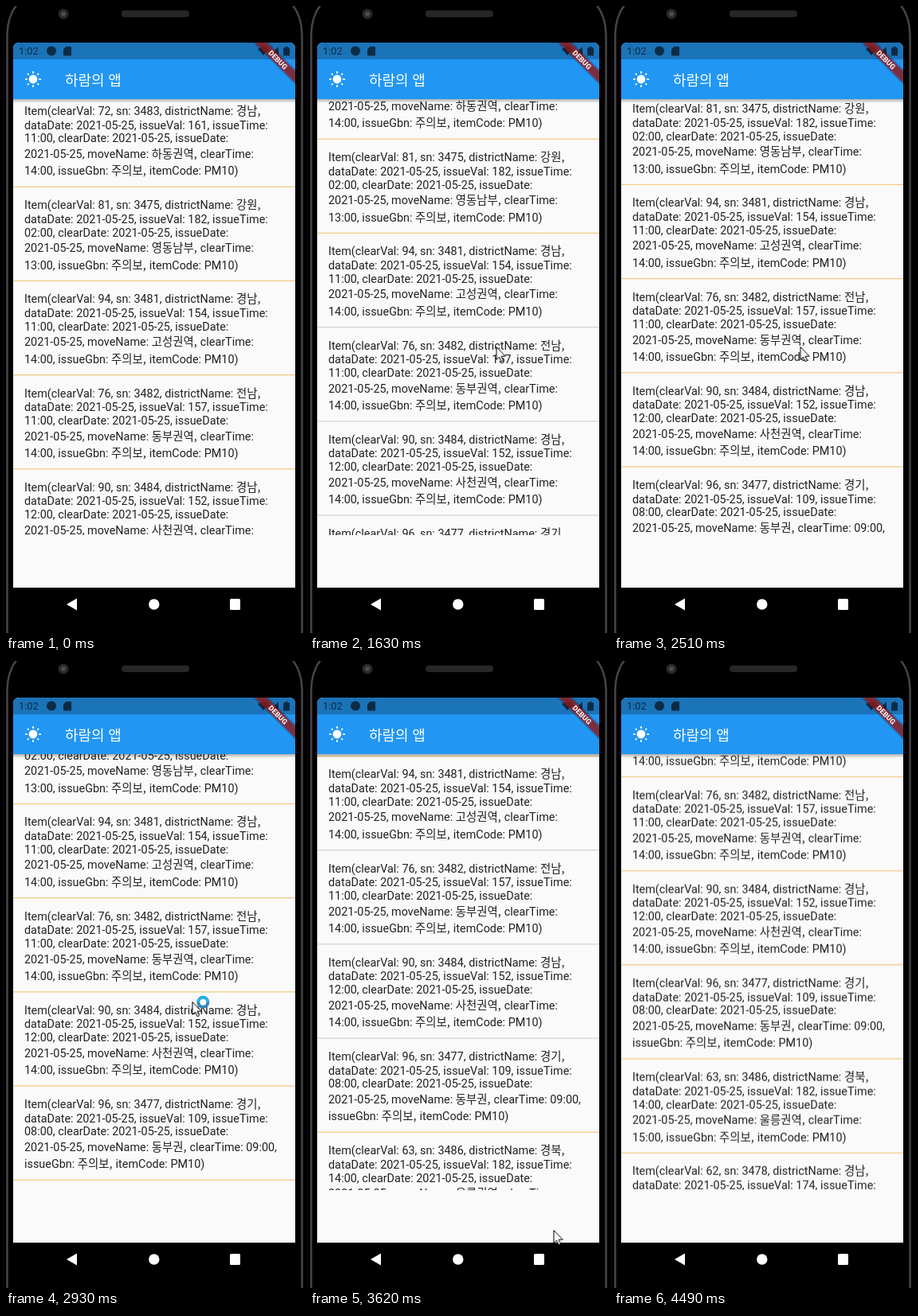
An HTML page that plays this animation: 374 by 788 pixels, repeating every 5.1 s.

```html
<!DOCTYPE html>
<html lang="ko">
<head>
<meta charset="utf-8">
<title>App list</title>
<style>
  html, body { margin: 0; width: 100%; height: 100%; overflow: hidden; background: #000; }
  svg { display: block; }
  text { font-family: Roboto, "Noto Sans CJK KR", "Noto Sans CJK", sans-serif; white-space: pre; }
  .item { font-size: 14.4px; fill: #212121; }
  .item tspan { font-family: "Noto Sans CJK KR", "Noto Sans CJK", sans-serif; }
</style>
</head>
<body>
<svg width="374" height="788" viewBox="0 0 374 788">
  <defs>
    <clipPath id="listArea"><rect x="9" y="117" width="354" height="548"/></clipPath>
    <clipPath id="screen"><path d="M9 731V54q0-8 8-8H355q8 0 8 8V731z"/></clipPath>
    <linearGradient id="shade" x2="0" y2="1">
      <stop stop-opacity=".3"/><stop offset="1" stop-opacity="0"/>
    </linearGradient>
    <filter id="blur"><feGaussianBlur stdDeviation="2.2"/></filter>
  </defs>

  <!-- phone body -->
  <rect width="374" height="788" fill="#000"/>
  <path d="M1.5 788V36Q2 12 14 -2M371.5 788V36Q371 12 359 -2" fill="none" stroke="#454547" stroke-width="2.5"/>
  <circle cx="72" cy="10" r="6.5" fill="#29292b"/>
  <circle cx="72" cy="10" r="3" fill="#4a4c52"/>
  <rect x="145" y="5.5" width="85" height="8.5" rx="4" fill="#262628"/>

  <g clip-path="url(#screen)">
    <rect x="9" y="46" width="354" height="685" fill="#fafafa"/>
    <g clip-path="url(#listArea)"><g id="list"></g></g>
    <rect x="9" y="117" width="354" height="5" fill="url(#shade)"/>
    <rect x="9" y="66" width="354" height="51" fill="#2196f3"/>
    <rect x="9" y="46" width="354" height="21" fill="#1b73b8"/>

    <!-- status bar -->
    <g fill="#0c2c46">
      <text x="16" y="61.3" font-size="12.8">1:02</text>
      <circle cx="57" cy="56.5" r="6"/>
      <path d="M75.5 51H81q1 0 1 1V61.5q0 1-1 1H73q-1 0-1-1V54.5z"/>
      <path d="M316 54Q323 48 330 54L323 62z"/>
      <path d="M342 51V62H331z"/>
      <path d="M348 52.5H350.5V51H353.5V52.5H356V62.5H348z"/>
    </g>

    <!-- app bar -->
    <g id="sun" transform="translate(34 92)" fill="#fff" stroke="#fff" stroke-width="1.8">
      <circle r="5.4" stroke="none"/>
    </g>
    <text x="74" y="99.5" font-size="18" fill="#fff">하람의 앱</text>

    <!-- banner -->
    <g transform="translate(341.4 67.6) rotate(45)">
      <rect x="-50" y="-5.4" width="100" height="10.8" opacity=".5" filter="url(#blur)"/>
      <rect x="-50" y="-5.4" width="100" height="10.8" fill="#b71c1c" opacity=".63"/>
      <text y="3.3" font-size="9.2" font-weight="900" fill="#fff" opacity=".9" text-anchor="middle">DEBUG</text>
    </g>
  </g>

  <!-- navigation keys -->
  <g fill="#fff">
    <path d="M89 744.5V759.5L76 752z"/>
    <circle cx="185.8" cy="752" r="6.7"/>
    <rect x="281" y="745" width="13" height="14" rx="1.5"/>
  </g>

  <g id="busy" opacity="0">
    <circle cx="247.3" cy="428.8" r="6" fill="#fff" stroke="#3a87b8" stroke-width="4"/>
    <path d="M241.3 428.8a6 6 0 0 1 12 0" fill="none" stroke="#26b0ee" stroke-width="3.5"/>
  </g>
  <path id="cursor" d="M.5 .5V16.5L4 13.2L6.5 18.8L9 17.7L6.6 12.2H11.7z" fill="#fff" stroke="#000"/>
</svg>

<script>
const LOOP = 5100, PITCH = 118.2;
const $ = id => document.getElementById(id);

// clearVal, sn, district, issueVal, issueTime, area, clearTime
const items = [
  [72, 3483, '경남', 161, 11, '하동권역', 14],
  [81, 3475, '강원', 182, '02', '영동남부', 13],
  [94, 3481, '경남', 154, 11, '고성권역', 14],
  [76, 3482, '전남', 157, 11, '동부권역', 14],
  [90, 3484, '경남', 152, 12, '사천권역', 14],
  [96, 3477, '경기', 109, '08', '동부권', '09'],
  [63, 3486, '경북', 182, 14, '울릉권역', 15],
  [62, 3478, '경남', 174, 14, '창녕권역', 16]
];
const baselines = [0, 17.5, 34.4, 54, 75.4];
const day = '2021-05-25';

// The comma and space after Korean text share its font.
const korean = s => `<tspan>${s}, </tspan>`;

function lines([clear, sn, district, value, issue, area, end]) {
  const gap = area.length < 4 ? [` ${end}:00,`, ''] : ['', `${end}:00, `];
  return [
    `Item(clearVal: ${clear}, sn: ${sn}, districtName: ${korean(district)}`,
    `dataDate: ${day}, issueVal: ${value}, issueTime:`,
    `${issue}:00, clearDate: ${day}, issueDate:`,
    `${day}, moveName: ${korean(area)}clearTime:${gap[0]}`,
    `${gap[1]}issueGbn: ${korean('주의보')}itemCode: PM10)`
  ];
}

$('list').innerHTML = items.map((item, i) => {
  const y = 137 + i * PITCH;
  const text = lines(item).map((s, n) =>
    `<text class="item" x="23" y="${y + baselines[n]}">${s}</text>`).join('');
  return `${text}<rect class="rule" x="9" y="${y + 89.6}" width="354" height="1.3" fill="#f1cb85"/>`;
}).join('');

$('sun').innerHTML += Array.from({ length: 8 }, (_, i) =>
  `<path d="M${i % 2 ? 7.6 : 7.2} 0H10" transform="rotate(${i * 45})"/>`).join('');

// Holds each [time, value] until the next one, forever.
function hold(el, prop, steps) {
  const frames = steps.map(([t, v]) => ({ offset: t / LOOP, [prop]: v, easing: 'steps(1, end)' }));
  frames.push({ offset: 1, [prop]: steps[steps.length - 1][1] });
  el.animate(frames, { duration: LOOP, iterations: Infinity });
}

// n evenly spaced poses from a to b between times t0 and t1.
function run(t0, t1, n, a, b, ease = k => k) {
  return Array.from({ length: n }, (_, i) => {
    const k = i / (n - 1);
    return [t0 + (t1 - t0) * k, a.map((v, j) => v + (b[j] - v) * ease(k))];
  });
}
const move = steps => steps.map(([t, [x, y]]) => [t, `translate(${x}px, ${y}px)`]);
const easeOut = k => 1 - (1 - k) ** 2;
const up = (t0, t1, n, a, b) => run(t0, t1, n, [0, -a], [0, -b]);

hold($('list'), 'transform', move([
  [0, [0, 0]],
  [1020, [0, -30]],
  ...up(1420, 1630, 4, 38, 60),
  ...up(2110, 2180, 2, 75, 91),
  ...up(2510, 2930, 7, 121, 166),
  [3000, [0, -173]],
  ...up(3070, 3550, 8, 180, 219),
  ...up(3620, 4020, 7, 226, 286.3),
  ...up(4150, 4490, 6, 293, 318.3)
]));

const away = [-60, 0];
hold($('cursor'), 'transform', move([
  [0, away],
  ...run(130, 620, 8, [355, 758], [233.5, 428], easeOut),
  ...run(3070, 3550, 8, [233.5, 428], [325, 743]),
  ...run(3620, 4020, 7, [305.5, 715], [216.5, 514]),
  ...run(4150, 4420, 5, [226, 540], [300, 762]),
  [4490, away]
]));

hold($('busy'), 'opacity', [[0, 0], [2720, 1], [3070, 0]]);

document.querySelectorAll('.rule').forEach((rule, i) => {
  if (i < 2 || i > 4) return;
  const warm = '#f1cb85', cool = '#d6d5d2';
  hold(rule, 'fill', [[0, warm], [1630, cool], [2110, warm], [3620, cool], [3685, warm]]);
});
</script>
</body>
</html>
```
